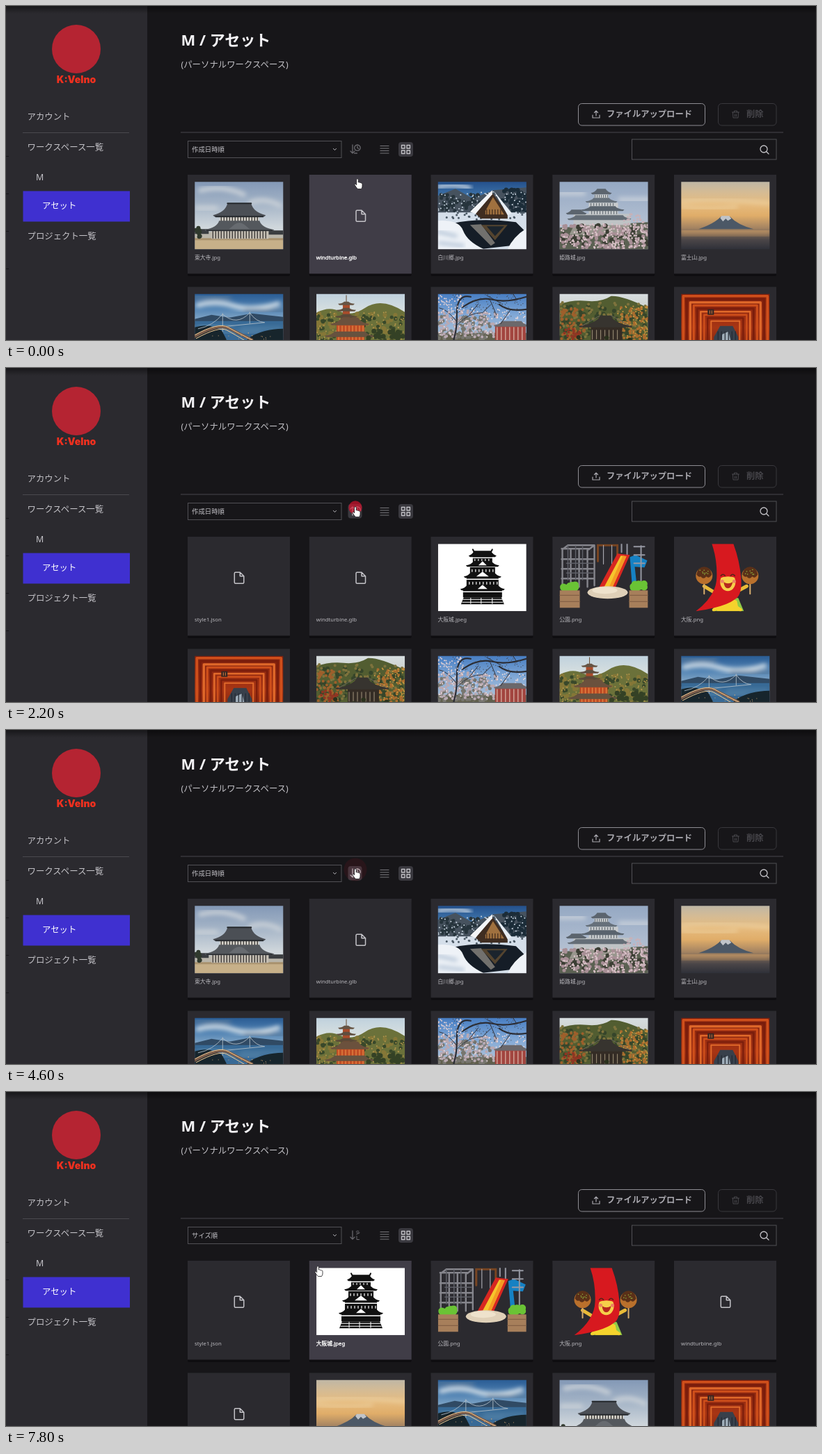
Write an HTML page that moves like this. It is 1164 px wide and 481 px high and loops after 8 s.

```html
<!DOCTYPE html>
<html lang="ja">
<head>
<meta charset="utf-8">
<title>アセット</title>
<style>
  html, body { margin: 0; width: 100%; height: 100%; overflow: hidden; background: #171619; }
  svg { display: block; }
  #stage { width: 1164px; height: 481px; }
  text { font: 12.4px "Noto Sans", "Noto Sans CJK JP", "Noto Sans CJK", sans-serif; fill: #c4c3c8; white-space: pre; }
  .title { font-size: 22px; font-weight: 700; fill: #f3f2f5; }
  .bold { font-size: 12.3px; font-weight: 700; fill: #a9a8ae; }
  .small { font-size: 9.4px; }
  .label { font-size: 7.8px; fill: #b9b8bd; }
  .brand { font: 900 14px Inter, sans-serif; fill: #f0301f; }
  .line { fill: none; stroke: #c4c3c8; stroke-linecap: round; stroke-linejoin: round; }
  .card > rect.face { fill: #2b2a2f; }
  .card.hover > rect.face { fill: #403d47; }
  .card.hover .label { fill: #fff; stroke: #fff; stroke-width: .3; }
  .card.hover .line { stroke: #f0f0f2; }
</style>
</head>
<body>
<svg id="stage" viewBox="0 0 1164 481" xmlns="http://www.w3.org/2000/svg">
  <defs id="defs">
    <linearGradient id="top" x2="0" y2="1"><stop stop-opacity=".45"/><stop offset="1" stop-opacity="0"/></linearGradient>
    <filter id="soft" x="0" y="0" width="1" height="1"><feGaussianBlur stdDeviation=".5"/></filter>
    <filter id="haze"><feGaussianBlur stdDeviation="3"/></filter>
    <symbol id="file" viewBox="0 0 127 97">
      <path class="line" stroke-width="1.5" d="M65 41h-6.500q-1.500 0-1.500 1.500v13q0 1.500 1.500 1.500h10.500q1.500 0 1.500-1.500v-9zv5.500h5.500"/>
    </symbol>
  </defs>

  <rect width="1164" height="481" fill="#171619"/>
  <rect width="203" height="481" fill="#2b2a2f"/>
  <path stroke="#17161a" d="M0 216.500h4M0 270.500h4M0 324.500h4M0 378.500h4"/>

  <circle cx="101" cy="62" r="35" fill="#b52432"/>
  <text class="brand" x="101" y="111" text-anchor="middle">K:Velno</text>
  <text x="30.500" y="164">アカウント</text>
  <path stroke="#4a494f" d="M24 182.500h153"/>
  <text x="30.500" y="208">ワークスペース一覧</text>
  <text x="43" y="251">M</text>
  <rect x="24.500" y="266.500" width="153.500" height="44" fill="#3f30d0"/>
  <text x="52" y="292" style="fill:#fff">アセット</text>
  <text x="30.500" y="336">プロジェクト一覧</text>

  <text class="title" x="251.500" y="57">M / アセット</text>
  <text x="251.500" y="89">(パーソナルワークスペース)</text>

  <rect x="822.500" y="140.500" width="182" height="31.500" rx="5" fill="none" stroke="#8e8d93"/>
  <path class="line" style="stroke:#a9a8ae" stroke-width="1.200" d="M843 157v4h10v-4M848 158v-7m-2.500 2.500l2.500-2.500 2.500 2.500"/>
  <text class="bold" x="863" y="160">ファイルアップロード</text>
  <rect x="1023.500" y="140.500" width="83.500" height="31.500" rx="5" fill="none" stroke="#39383d"/>
  <path class="line" style="stroke:#47464b" d="M1043.500 153h10m-9 0l.5 8h7l.5-8m-6 0v-2h4v2m-3 3v3m2-3v3"/>
  <text class="bold" x="1064" y="160" style="fill:#47464b">削除</text>
  <path stroke="#48474c" d="M251 182h866"/>

  <rect x="261.500" y="194.500" width="220.500" height="24" fill="none" stroke="#515055"/>
  <text id="selected" class="small" x="267" y="209.500"></text>
  <path class="line" d="M470.500 205.500l2 2 2-2"/>
  <rect id="sortFace" x="491.500" y="196" width="20" height="20.500" rx="4" fill="#3a393f"/>
  <g id="sort" class="line" stroke-width="1.300">
    <path id="arrowDown" d="M498 200v12m-3-3l3 3 3-3"/>
    <path id="arrowUp" d="M498 212v-12m-3 3l3-3 3 3"/>
    <path id="clock" d="M505 200a4.200 4.200 0 1 1-.1 0M505 202v2.500l1.800 1M500.500 212h4"/>
    <path id="sizes" stroke-width="1" d="M507 200.500q-3.500-1.500-3.500.8t3.500 1.500-3.500 2.200M504 207.500v5h3.500"/>
  </g>
  <path class="line" style="stroke:#77767b" stroke-width="1.200" d="M538 201.500h12m-12 3.500h12m-12 3.500h12m-12 3.500h12"/>
  <rect x="564" y="196" width="21" height="21" rx="4" fill="#3a393f"/>
  <path class="line" stroke-width="1.300" d="M568.500 200.500h4.500v4.500h-4.500zm7.500 0h4.500v4.500h-4.500zm-7.500 7.500h4.500v4.500h-4.500zm7.500 0h4.500v4.500h-4.500z"/>
  <rect x="899.500" y="192" width="207.500" height="29" fill="none" stroke="#515055"/>
  <path class="line" stroke-width="1.300" d="M1094 206a5 5 0 1 0-10 0 5 5 0 1 0 10 0m-1.300 3.700l3.300 3.300"/>

  <g id="views"></g>

  <g id="menu">
    <rect x="261" y="220" width="221.500" height="62" fill="#403d47" stroke="#4b4952" stroke-width=".6"/>
    <text class="small" x="267" y="234">作成日時順</text>
    <text class="small" x="267" y="254">サイズ順</text>
    <text class="small" x="267" y="274">名前順</text>
    <path class="line" d="M467 231l2.500 2.500 4.500-5"/>
  </g>
  <circle id="ripple" fill="#d8102c"/>
  <path id="hand" fill="#fff" stroke="#1b1a1e" stroke-width=".8" stroke-linejoin="round"
    d="M-1.300.5Q0-1 1.300.5V5q1.500-.7 2 .4 1.600-.5 2 .6 1.700-.2 1.700 1.500v3.500q-.3 2-1.500 3.500h-5Q-2 12-4 8.500q0-1.600 1.500-1l1.200 1.300z"/>
  <rect width="1164" height="11" fill="url(#top)"/>
</svg>

<script>
const $ = id => document.getElementById(id);

// Drawing helpers for the 127 x 97 thumbnails
const shape = (fill, d) => `<path fill="${fill}" d="${d}"/>`;
const stroke = (color, width, d) => `<path fill="none" stroke="${color}" stroke-width="${width}" stroke-linecap="round" d="${d}"/>`;
const box = (fill, x, y, w, h) => `<rect fill="${fill}" x="${x}" y="${y}" width="${w}" height="${h}"/>`;
const dot = (fill, x, y, r, ry = r) => `<ellipse fill="${fill}" cx="${x}" cy="${y}" rx="${r}" ry="${ry}"/>`;
const haze = content => `<g filter="url(#haze)">${content}</g>`;
const photo = content => `<g filter="url(#soft)">${content}</g>`;

let gradients = 0;
function backdrop(...colors) {
  const id = `sky${gradients++}`;
  const stops = colors.map((c, i) => `<stop offset="${i / (colors.length - 1)}" stop-color="${c}"/>`).join('');
  return `<linearGradient id="${id}" x2="0" y2="1">${stops}</linearGradient>` + box(`url(#${id})`, -4, -4, 135, 105);
}

function specks(color, size, count, x, y, w, h) {
  let seed = count * 7 + x + y * 3 + size * 11;
  const random = () => (seed = (seed * 16807 + 11) % 2147483647) / 2147483647;
  for (let i = 0; i < 5; i++) random();
  let d = '';
  for (let i = 0; i < count; i++) d += `M${(x + random() * w).toFixed(1)} ${(y + random() * h).toFixed(1)}h.1`;
  return stroke(color, size, d);
}

// A roof with upturned eaves
const roof = (fill, cx, y, ridge, eave, h) =>
  shape(fill, `M${cx - ridge} ${y}H${cx + ridge}Q${cx + ridge + 3} ${y + h * .7} ${cx + eave} ${y + h - 1}l-2 2H${cx - eave + 2}l-2-2Q${cx - ridge - 3} ${y + h * .7} ${cx - ridge} ${y}z`);

const columns = (color, x, y, w, h, step) => {
  let d = '';
  for (let i = x; i <= x + w; i += step) d += `M${i} ${y}v${h}`;
  return stroke(color, 1.2, d);
};

const art = {
  temple: () => photo(backdrop('#7f95b4', '#a3b3c6', '#d0d7dc', '#d4dbe0') +
    haze(stroke('#c6ced6', 7, 'M8 12Q40 4 70 18M80 30Q100 22 122 34M4 38H30')) +
    box('#c7b089', 0, 80, 127, 17) + box('#a8916d', 0, 80, 127, 4) +
    box('#b9b5aa', 0, 72, 127, 9) + shape('#3a3d40', 'M0 68H20V75H0zM106 70H127V76H106z') +
    box('#d3d0c8', 36, 46, 56, 15) + columns('#2d2a28', 38, 47, 52, 13, 4) +
    roof('#4b4f55', 64, 31, 17, 38, 18) + stroke('#25282c', 2, 'M47 31H81M30 50H98') +
    box('#c3bdb2', 24, 68, 82, 14) + columns('#2d2927', 26, 69, 78, 12, 4) +
    roof('#54585d', 64, 56, 29, 50, 14) + stroke('#282b2f', 1.5, 'M17 70H111') +
    shape('#676b70', 'M54 64Q64 54 74 64L79 68H49z') +
    specks('#30392d', 6, 12, 0, 66, 8, 14)),

  village: () => photo(backdrop('#1f4a86', '#4d86b9', '#dce5ee', '#dce4ee') +
    haze(stroke('#e6edf3', 5, 'M0 7Q24 2 46 9')) +
    shape('#46525e', 'M0 20L25 10 50 24 80 12 127 8V48H0z') + specks('#26343c', 5, 60, 2, 18, 60, 24) +
    specks('#1b2c38', 6, 60, 92, 10, 35, 36) + specks('#c3d0db', 2, 80, 0, 14, 127, 32) +
    box('#d5dfea', 0, 44, 127, 53) + specks('#4c5a66', 3, 34, 0, 44, 127, 10) +
    shape('#3f2d21', 'M54 46L78 16 100 46V53H62z') + shape('#f4f6f8', 'M78 12L46 43 54 46 78 18z') +
    shape('#a0713f', 'M68 42L79 22 95 47H68z') + columns('#3d2a1d', 70, 40, 22, 9, 4) +
    shape('#e8eef4', 'M80 13L106 45 100 48z') +
    shape('#151d27', 'M20 60Q60 51 112 58L124 70 104 92 60 97 36 82z') +
    shape('#72716e', 'M46 62L62 61 82 88 76 92z') + shape('#54442f', 'M62 62L100 62 82 84z') + shape('#1b242d', 'M70 64H95L82 78z') +
    shape('#eef2f7', 'M0 56Q30 54 36 70T66 97H0zM127 67Q108 79 100 97H127z') +
    haze(stroke('#a9bbd0', 4, 'M0 72L26 78M2 88L36 92'))),

  whiteCastle: () => photo(backdrop('#93a7c2', '#adbbcf', '#c6ccd5') +
    haze(stroke('#c3ccd8', 8, 'M0 16H34M88 26H127')) +
    shape('#5b6152', 'M0 66L127 58V97H0z') +
    shape('#98968d', 'M22 60L96 54 104 76H14z') +
    box('#cfd2d3', 50, 18, 20, 40) + box('#c7cacc', 42, 30, 42, 32) + box('#bfc3c5', 20, 46, 82, 16) +
    roof('#5b646e', 60, 10, 6, 15, 7) + roof('#66707a', 60, 23, 11, 23, 6) +
    roof('#59636d', 62, 35, 18, 31, 6) + roof('#646d76', 57, 48, 34, 46, 6) + roof('#5b646d', 24, 40, 7, 15, 6) +
    columns('#6b737a', 46, 42, 36, 4, 4) + columns('#6b737a', 51, 19, 18, 3, 3) + columns('#6b737a', 45, 31, 32, 3, 4) +
    specks('#3c3e34', 7, 45, 0, 62, 127, 34) + specks('#a88f96', 5, 100, 0, 62, 127, 34) +
    specks('#d8c0c6', 2.5, 190, 0, 60, 127, 36) + specks('#c7b1b8', 3, 60, 92, 46, 36, 40)),

  mountain: () => photo(backdrop('#b9b5a9', '#d3bb96', '#e6bc80', '#e0ad69', '#a58462', '#4b4648', '#262a34') +
    haze(stroke('#efd6a8', 3, 'M0 28Q50 22 127 31M0 36Q40 40 80 36')) +
    shape('#4c5866', 'M25 68Q48 60 57 50H70Q81 62 104 68z') +
    shape('#c0c4c9', 'M56 52L58 49H69L72 53 67 56 64 53 60 57z') +
    haze(stroke('#c89a66', 5, 'M0 71H127') + stroke('#8d7257', 4, 'M0 78H127'))),

  bridge: () => photo(backdrop('#22558f', '#5586b5', '#a5bfd3', '#35597c', '#1c3047') +
    haze(stroke('#dce5eb', 6, 'M4 16Q30 9 56 17T120 14') + stroke('#55799c', 5, 'M0 5H50M72 24H127')) +
    shape('#304a64', 'M0 36L24 30 50 34 82 28 127 33V44H0z') +
    box('#386a96', 0, 39, 127, 58) + haze(stroke('#6f9bbb', 2, 'M4 45H55M66 50H124M34 56H95')) +
    shape('#17252c', 'M0 48Q20 41 39 53L62 97H0zM127 50Q98 50 76 64L68 97H127z') +
    stroke('#aebcc6', .9, 'M40 28v26M79 26v16M40 29Q26 46 5 50M40 29Q60 47 79 27Q88 40 100 41M40 47L100 41') +
    stroke('#7a5c4a', 4, 'M0 61Q34 42 48 49T82 66L94 97') + stroke('#f6cc94', 1, 'M0 59Q34 40 48 48T84 67M2 64Q35 46 46 52T77 70') +
    specks('#d2a673', 1, 24, 4, 55, 114, 22)),

  pagoda: () => photo(backdrop('#bccfdd', '#dde3e0', '#948749', '#4a5429') +
    shape('#6b713a', 'M0 27Q18 17 34 25T70 20Q94 4 127 26V97H0z') +
    specks('#857737', 6, 90, 0, 28, 127, 44) + specks('#39482a', 5, 110, 0, 30, 127, 50) + specks('#b0934a', 2, 110, 0, 26, 127, 50) +
    stroke('#674a32', 1, 'M43 2V16') + box('#a84c2b', 38, 14, 10, 28) +
    roof('#665444', 43, 11, 3, 12, 4) + roof('#5f4e3f', 43, 20, 4, 14, 4) + roof('#5b4938', 43, 29, 5, 16, 4) +
    box('#c04d25', 29, 43, 40, 26) + roof('#6b513d', 48, 34, 12, 28, 10) +
    columns('#e58a45', 32, 46, 36, 20, 5) + roof('#66523f', 48, 54, 22, 36, 7) + specks('#344125', 7, 28, 72, 53, 55, 20)),

  blossoms: () => photo(backdrop('#4078c0', '#82a9d6', '#b5c6d9', '#5d6658') +
    box('#605f4c', 0, 56, 127, 41) + specks('#77766f', 5, 90, 0, 32, 76, 36) +
    specks('#b9a9b2', 4, 110, 0, 24, 90, 38) + specks('#e6d7da', 2, 130, 0, 20, 127, 42) +
    box('#a2453f', 82, 46, 44, 40) + roof('#6b686b', 106, 39, 14, 26, 7) + columns('#d9b7aa', 85, 48, 40, 20, 6) +
    stroke('#2b2d35', 2.2, 'M127 4Q98 13 78 8T35 19M127 22Q102 26 88 15M9 97Q28 65 27 32T47 4') +
    stroke('#30323b', 1, 'M28 44Q45 26 64 27L76 15M27 40Q14 22 2 20M90 13L70 2M58 14L45 30M104 23L90 43M113 8L108 0M75 9L84 30') +
    specks('#43444b', 1.2, 110, 20, 0, 105, 38) + specks('#dccdd3', 2, 55, 0, 2, 36, 26)),

  autumn: () => photo(backdrop('#d9dfe3', '#c8ccc5', '#5c633c', '#353522') +
    shape('#525d31', 'M0 15Q18 8 39 10T74 3Q91 2 127 20V97H0z') +
    specks('#36452a', 6, 90, 0, 18, 127, 50) + specks('#7e733d', 4, 100, 0, 12, 127, 50) +
    specks('#9e5f2b', 4, 70, 0, 21, 36, 45) + specks('#a96c2e', 4, 70, 88, 18, 39, 48) + specks('#c9973f', 2, 90, 82, 16, 45, 48) +
    specks('#8f3522', 4, 20, 2, 49, 28, 16) +
    box('#342c25', 45, 46, 45, 30) + roof('#37342f', 66, 31, 8, 39, 16) + stroke('#6d665a', 1, 'M58 31L32 46M74 31L101 46') +
    columns('#8f836d', 47, 52, 40, 13, 6) + specks('#2a311d', 6, 30, 26, 62, 80, 30)),

  gates: () => {
    let gates = '';
    for (let i = 0; i < 9; i++) {
      const left = 3 + i * 5, right = 124 - i * 5, y = 3 + i * 4.500;
      gates += stroke(['#cf4f1b', '#7a1d0c', '#e0692a'][i % 3], 3.600 - i * .2, `M${left} 97V${y}M${right} 97V${y}M${left} ${y}H${right}`);
    }
    return photo(backdrop('#7e1f0d', '#a83514', '#5b190d') + gates +
      shape('#38404b', 'M47 97V62L56 46H74L82 62V97z') + shape('#9eacb8', 'M53 97L59 58 68 54 78 97z') +
      columns('#232a34', 53, 54, 25, 36, 5) + box('#352623', 38, 22, 9, 8) + stroke('#d87a3c', 1, 'M41 24v4m3-4v4'));
  },

  blackCastle: () => box('#fff', 0, 0, 127, 97) +
    box('#111', 50, 16, 28, 10) + box('#111', 46, 30, 36, 13) + box('#111', 41, 47, 46, 14) + box('#111', 36, 65, 56, 12) +
    stroke('#fff', 1.4, 'M48 20H80M44 33H84M40 51H88M36 69H92') +
    columns('#fff', 53, 22, 24, 2, 5) + columns('#fff', 49, 37, 32, 3, 5) + columns('#fff', 45, 55, 40, 3, 5) +
    roof('#111', 64, 10, 12, 20, 8) + roof('#111', 64, 25, 13, 24, 7) + roof('#111', 64, 41, 17, 27, 7) + roof('#111', 64, 59, 22, 32, 7) +
    stroke('#111', 2, 'M52 12l-2-4M76 12l2-4') + shape('#fff', 'M58 31L64 25 70 31zM55 47L64 40 73 47zM57 65L64 59 71 65z') +
    shape('#111', 'M37 77H91L95 87H33z') + stroke('#fff', 1, 'M36 80H92M35 84H93M47 78v8M62 78v8M78 78v8'),

  park: () =>
    stroke('#85858c', 2.4, 'M3 7H42M3 22H50M3 36H50M3 50H50M4 7V61M16 7V62M28 7V62M40 7V62M50 3V60M12 2H50M4 8L12 2M42 8L50 2') +
    stroke('#5f6068', 1.5, 'M12 3V52M23 3V52M33 3V52M10 28H48M10 42H48') +
    stroke('#784522', 3, 'M55 25V2H83V25') + stroke('#a5a6ad', 1.2, 'M63 2V29M75 2V29') +
    shape('#1681c3', 'M101 19L109 16 126 24 122 34 108 33 112 70H105z') +
    stroke('#9698a2', 2, 'M89 12V0M97 15V0M117 3V53M107 4H122M107 16H122M107 28H122') +
    shape('#d82721', 'M83 14L101 16 76 72 57 62z') + shape('#f6c52d', 'M88 17L96 18 73 69 63 64z') + shape('#f49a23', 'M91 17L96 18 73 69 69 67z') +
    dot('#dfd0b8', 69, 70, 29, 9) + dot('#eee2cc', 65, 67, 18, 5) +
    specks('#6ac335', 10, 16, 5, 57, 18, 8) + specks('#6ac335', 10, 16, 104, 56, 18, 9) +
    box('#a77f5b', 0, 67, 29, 25) + box('#a77f5b', 100, 67, 27, 25) + stroke('#856146', 1.2, 'M0 74H29M0 83H29M100 74H127M100 83H127'),

  mascot: () =>
    shape('#8fca48', 'M50 76L82 78 90 97H45z') + shape('#f5d32d', 'M55 81L67 76 80 82 83 97H51z') +
    stroke('#e9ba37', 5, 'M48 70L33 61M79 69L94 61') + stroke('#f5d32d', 5, 'M57 89L47 95M76 89L85 95') +
    shape('#d7191f', 'M44 0H75Q84 24 86 49T77 80Q63 91 21 97Q50 75 51 49T44 0z') +
    dot('#f6cf4a', 67, 55, 11, 13) + shape('#d7191f', 'M54 36H81V50Q67 44 54 50z') +
    stroke('#5a2318', 1.5, 'M57 46q3-4 6 0M71 46q3-4 6 0') +
    shape('#b6271e', 'M61 55Q67 59 74 55Q72 64 67 64T61 55z') + dot('#ed8261', 59, 54, 2.5) + dot('#ed8261', 76, 54, 2.5) +
    [33, 99].map(x => stroke('#d8ad6d', 2, `M${x} 55V72`) + dot('#b9702c', x, 46, 12) +
      shape('#5a3018', `M${x - 11} 44q2-11 11-11t11 11q-4 7-8 3-4 5-8 0-3 2-6-3z`) +
      specks('#8daf3e', 1.5, 9, x - 7, 37, 14, 7)).join('')
};
$('defs').innerHTML += Object.entries(art)
  .map(([name, draw]) => `<symbol id="${name}" viewBox="0 0 127 97">${draw()}</symbol>`).join('');

const views = [
  ['temple 東大寺.jpg', 'file windturbine.glb', 'village 白川郷.jpg', 'whiteCastle 姫路城.jpg', 'mountain 富士山.jpg',
    'bridge', 'pagoda', 'blossoms', 'autumn', 'gates'],
  ['file style1.json', 'file windturbine.glb', 'blackCastle 大阪城.jpeg', 'park 公園.png', 'mascot 大阪.png',
    'gates', 'autumn', 'blossoms', 'pagoda', 'bridge'],
  ['file style1.json', 'blackCastle 大阪城.jpeg', 'park 公園.png', 'mascot 大阪.png', 'file windturbine.glb',
    'file', 'mountain', 'bridge', 'temple', 'gates']
];
const card = (item, i) => {
  const [picture, label = ''] = item.split(' ');
  const x = 261 + (i % 5) * 174.75, y = i < 5 ? 243 : 404.5;
  return `<g class="card" transform="translate(${x} ${y})">
    <rect y="3" width="147" height="143" rx="2" fill="#0e0d10"/><rect class="face" width="147" height="142.500"/>
    <use href="#${picture}" x="10.300" y="10.300" width="127" height="97"/>
    <text class="label" x="10" y="121.500">${label}</text></g>`;
};
$('views').innerHTML = views.map(items => `<g>${items.map(card).join('')}</g>`).join('');
const viewNodes = [...$('views').children];

const LOOP = 8000, STEP = 200, RIPPLE = 700;
const RESPONSE = 250, BUSY_FROM = 150, BUSY_TO = 450;  // time after a click
const cursorPath = [[0, 505, 249], [200, 505, 249], [800, 502, 200], [4600, 502, 200],
  [5300, 473, 205], [6200, 473, 205], [6900, 448, 251], [LOOP, 448, 251]];
const sortClicks = [950, 2100, 3500, 4050], menuClick = 5450, sizeClick = 7100;
const clicks = [...sortClicks, menuClick, sizeClick];

function cursorAt(t) {
  const i = cursorPath.findIndex(key => key[0] > t);
  const [t0, x0, y0] = cursorPath[i - 1], [t1, x1, y1] = cursorPath[i];
  const p = (t - t0) / (t1 - t0), ease = p * p * (3 - 2 * p);
  return [x0 + (x1 - x0) * ease, y0 + (y1 - y0) * ease];
}

const show = (node, on) => node.style.display = on ? '' : 'none';

function render(t) {
  const [x, y] = cursorAt(t);
  const bySize = t >= sizeClick + RESPONSE;
  const toggles = sortClicks.filter(c => t >= c + RESPONSE).length;
  const view = bySize ? 2 : toggles % 2;
  const menuOpen = t >= menuClick + BUSY_FROM && !bySize;
  const loading = sortClicks.some(c => t >= c + BUSY_FROM && t < c + BUSY_TO);
  const overSort = Math.abs(x - 502) < 11 && y < 217 && !loading;

  viewNodes.forEach((node, i) => show(node, i === view));
  viewNodes[view].children[1].classList.toggle('hover', y > 243 && !menuOpen);
  $('selected').textContent = bySize ? 'サイズ順' : '作成日時順';
  show($('menu'), menuOpen);
  show($('sortFace'), overSort);
  show($('arrowDown'), view !== 1);
  show($('arrowUp'), view === 1);
  show($('clock'), !bySize);
  show($('sizes'), bySize);
  $('sort').style.stroke = loading ? '#414045' : overSort ? '#b9b8bd' : '#68676c';
  $('hand').setAttribute('transform', `translate(${x} ${y})`);

  const click = clicks.filter(c => c <= t && t < c + RIPPLE).pop();
  show($('ripple'), click !== undefined);
  if (click === undefined) return;
  const left = 1 - (t - click) / RIPPLE, [cx, cy] = cursorAt(click);
  $('ripple').setAttribute('cx', cx);
  $('ripple').setAttribute('cy', cy + 1);
  $('ripple').setAttribute('r', 7 + 10 * (1 - left * left));
  $('ripple').setAttribute('opacity', .85 * left ** 1.5);
}

function tick() {
  render(Math.floor(performance.now() % LOOP / STEP) * STEP);
  requestAnimationFrame(tick);
}
tick();
</script>
</body>
</html>
```
